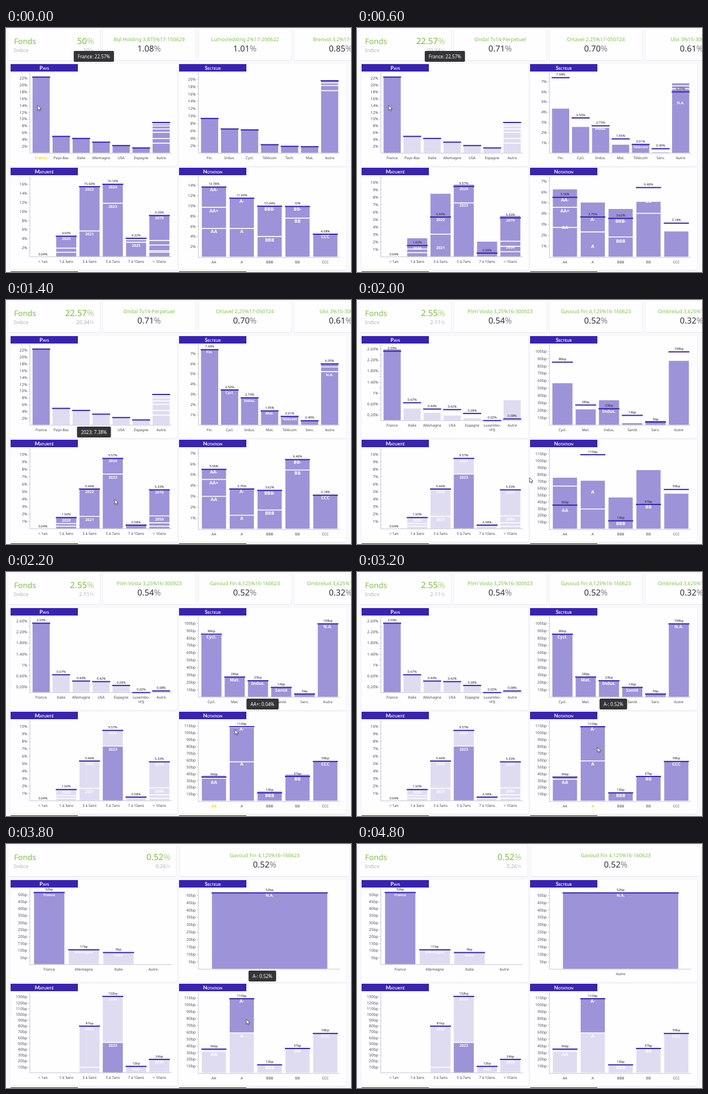
An HTML page for the animation above (5 s loop, 600 by 426 pixels).

```html
<!DOCTYPE html>
<html lang="fr">
<head>
<meta charset="utf-8">
<title>Tableau de bord</title>
<style>
html, body { margin: 0; width: 100%; height: 100%; overflow: hidden; background: #f9f8fa; }
body { position: relative; font-family: "Noto Sans", "Open Sans", sans-serif; }
svg { position: absolute; left: 0; top: 0; text-rendering: geometricPrecision; }
.card { fill: #fefdff; filter: drop-shadow(0 1px 1px #00000012); }
.head { fill: #3823b2; }
.title { fill: #fff; font: 700 9.2px Lato, "Noto Sans", sans-serif; font-variant: small-caps; }
.axis { stroke: #c9c8ce; fill: none; }
.bar { stroke: #fff; stroke-width: 1.5; }
.tick { font-size: 6.8px; fill: #555; }
.label { font-size: 6.3px; fill: #444; }
.hot { fill: #ffd500; font-weight: 700; }
.value { font-size: 5.6px; fill: #222; }
.name { fill: #fff; font-weight: 700; }
.mark { fill: #3522b0; }
#tip { position: absolute; transform: translateX(-50%); height: 19px; padding: 0 7px; border-radius: 2px;
  background: #343336; color: #fff; font-size: 8px; line-height: 19px; white-space: nowrap; }
</style>
</head>
<body>
<svg id="stage" width="600" height="426" viewBox="0 0 600 426"></svg>
<div id="tip"></div>
<script>
const STEP = 200, LOOP = 5000, EASE_MS = 500, LEAD_MS = 195;
const SOLID = '#9d93d8', PALE = '#dfdcf2';

// view: pixels per unit, tick step, last tick, unit, values shown, name size, selection, bars, base
// bar: label|total|top name|name@level...
const view = (k, step, max, unit, values, size, sel, bars, base) => ({
  k, step, max, unit, values, size, sel, base,
  bars: bars.split(';').map(b => {
    const [label, total, ...parts] = b.split('|');
    const segs = (parts.length ? parts : ['']).map(p => {
      const [name, level] = p.split('@');
      return { name, level: +(level ?? total) };
    });
    return { label, total: +total, segs };
  })
});

const countries = 'France|22.57;Pays-Bas|5.1;Italie|4.5;Allemagne|3.4;USA|2.4;Espagne|1.7;' +
  'Autre|9.2||@8.6|@8|@7.1|@6.1|@4.3|@2.9';
const years = '< 1an|0.04;1 à 3ans|1.6|2020|@0.7|@0.35;3 à 5ans|5.44|2022|2021@1.68;' +
  '5 à 7ans|9.57|2024|2023@7.38;7 à 10ans|0.58;> 10ans|5.33|2079|2050@1.75|@0.8|@0.35';
const ratings = 'AA|36||AA@32;A|110|A-|A@59;BBB|13|BBB;BB|37|BB;CCC|59|CCC';
const sectors = 'Cycl.|86|Cycl.;Mat.|28|Mat.;Indus.|23|Indus.;Santé|14|Santé;Serv.|5;Autre|100|N.A.';

const charts = [
  { title: 'Pays', x: 8, y: 63, base: 218.5, views: [
    view(5.93, 2, 22, '%', 0, 6, '', countries),
    view(5.93, 2, 22, '%', 0, 6, 'France', countries),
    view(47.9, 0.2, 2.6, '%', 1, 6, 'France', 'France|2.55;Italie|0.67;Allemagne|0.44;USA|0.42;' +
      'Espagne|0.28;Luxembo- urg|0.02;Autre|0.08', 210.5),
    view(2.44, 5, 50, 'bp', 1, 6, 'France',
      'France|52|France;Allemagne|11|Allemagne;Italie|9|Italie;Autre|0', 210.5)
  ] },
  { title: 'Secteur', x: 301, y: 63, base: 218.5, views: [
    view(6.45, 2, 20, '%', 0, 6.3, '', 'Fin.|9.55;Indus.|6.7;Cycl.|6.45;Télécom|2.45;Tech.|2;Mat.|1.9;' +
      'Autre|19.75||@19|@18.3|@16.9'),
    view(17.85, 1, 7, '%', 1, 6.3, '', 'Fin.|7.44|Fin.;Cycl.|3.5|Cycl.;Indus.|2.73|Indus.;Mat.|1.45|Mat.;' +
      'Télécom|0.91|Télécom;Serv.|0.49;Autre|6.05||@5.7|N.A.@5.23'),
    view(1.29, 10, 100, 'bp', 1, 7.5, '', sectors),
    view(2.58, 5, 50, 'bp', 1, 6.8, '', 'Autre|52|N.A.')
  ] },
  { title: 'Maturité', x: 8, y: 244, base: 399.5, views: [
    view(7.9, 2, 16, '%', 1, 6.6, '', '< 1an|0.04;1 à 3ans|4.69|2020|@1.9|@1;3 à 5ans|15.63|2022|2021@5.7;' +
      '5 à 7ans|16.16|2024|2023@11.83;7 à 10ans|4.22||@3.8|2025@3.2;> 10ans|9.26|2079|@3.6|@2.6|@1.3|@1'),
    view(12.95, 1, 10, '%', 1, 6.6, '', years),
    view(12.95, 1, 10, '%', 1, 6.6, '2023', years),
    view(1.018, 10, 130, 'bp', 1, 6.6, '2023', '< 1an|0;1 à 3ans|0;3 à 5ans|81|2022|@9.5;' +
      '5 à 7ans|132|2024|2023@52;7 à 10ans|12|2027;> 10ans|24|2039')
  ] },
  { title: 'Notation', x: 301, y: 244, base: 400, views: [
    view(8.95, 2, 14, '%', 1, 8, '', 'AA|13.78|AA-|AA+@9.7|AA@5.58;A|11.6|A-|A@5.58;' +
      'BBB|10.04|BBB-|BBB@4;BB|10|BB-|BB@7.6;CCC|4.58|CCC'),
    view(18.95, 1, 7, '%', 1, 8, '', 'AA|5.56|AA-|AA+@4.57|AA@3.02;A|3.75|A-|A@1.28;' +
      'BBB|3.62|BBB-|BBB@1.76;BB|6.46|BB-|BB@5.45;CCC|3.18|CCC'),
    view(1.19, 10, 110, 'bp', 1, 8, '', ratings),
    view(1.19, 10, 110, 'bp', 1, 8, 'A-', ratings)
  ] }
];

const cards = [
  ['50', '50', ['Bql Holding 3,875%17-150629', '1.08'], ['Lumocrediting 2%17-290622', '1.01'], ['Brenvol 3,2%17-010525', '0.85']],
  ['22.57', '20.34', ['Ondal Tv14-Perpetuel', '0.71'], ['Ortavel 2,25%17-050724', '0.70'], ['Ulvi 3%15-300622', '0.61']],
  ['2.55', '2.11', ['Plim Vosta 3,25%16-300923', '0.54'], ['Gavoud Fin 4,125%16-160623', '0.52'], ['Ombrelud 3,625%16-150623', '0.32']],
  ['0.52', '0.26', ['Gavoud Fin 4,125%16-160623', '0.52']]
];

// Timed steps: each entry holds until the next one.
const stateSteps = [[0, 0], [600, 1], [2000, 2], [3400, 3]];
const cursorSteps = [[0, 55, 135], [1200, 150, 250], [1400, 189, 348], [2000, 300, 310], [2200, 398, 275],
  [2400, 410, 292], [2600, 418, 306], [4400, 503, 345], [4600]];
const tipSteps = [[0, 'France: 22.57%', 153, 40], [1200], [1400, '2023: 7.38%', 153, 221], [2000],
  [2200, 'AA+: 0.04%', 446, 221], [2400, 'A-: 0.52%', 446, 221], [4400, 'BB: 0.37%', 446, 221], [4600]];
const hotSteps = [[0, 'France'], [600], [2200, 'AA'], [2400, 'A'], [3400], [4400, 'BB'], [4600]];

const at = (steps, t) => steps.findLast(s => s[0] <= t);
const mix = (a, b, p) => a + (b - a) * p;
const ease = u => u <= 0 ? 0 : u >= 1 ? 1 : u < .5 ? 4 * u ** 3 : 1 - (2 - 2 * u) ** 3 / 2;
const format = (v, unit) => (unit === '%' && v % 1 ? v.toFixed(2) : v) + unit;
const esc = s => String(s).replace('<', '&lt;').replace('>', '&gt;');
const rect = (x, y, w, h, attr) => `<rect x="${x}" y="${y}" width="${w}" height="${h}" ${attr}/>`;
const text = (x, y, s, attr, anchor = 'middle') =>
  `<text x="${x}" y="${y}" text-anchor="${anchor}" ${attr}>${s}</text>`;
const percent = (x, y, n, size, color, anchor) =>
  text(x, y, `${n}<tspan fill-opacity=".6">%</tspan>`, `font-size="${size}" fill="${color}"`, anchor);

function layout(chart, i) {
  const v = chart.views[i], base = v.base ?? chart.base;
  const step = 247 / (v.bars.length + .1);
  return v.bars.map((b, n) => ({
    ...b, x: chart.x + 34 + step * (n + .1), w: step * .9, top: base - b.total * v.k,
    segs: b.segs.map(s => ({ name: s.name, y: base - s.level * v.k }))
  }));
}

function drawChart(chart, i, p, hot) {
  const v = chart.views[i], base = v.base ?? chart.base, left = chart.x + 34;
  const old = i ? layout(chart, i - 1) : [];
  let out = rect(chart.x, chart.y, 290, 178, 'class="card"') + rect(chart.x, chart.y, 117, 13, 'class="head"') +
    text(chart.x + 58.5, chart.y + 9.5, chart.title, 'class="title"');

  let path = `M${left - .5} ${chart.y + 15}V${Math.floor(base) + .5}H${left + 246}`;
  for (let n = 1; n * v.step < v.max + .01; n++) {
    const value = +(n * v.step).toFixed(2), y = base - value * v.k;
    path += `M${left - 3} ${y}h3`;
    if (v.step > .5 || n % 2) out += text(left - 5, y + 2.2, format(value, v.unit), 'class="tick"', 'end');
  }

  let marks = '', texts = '';
  for (const b of layout(chart, i)) {
    const from = i ? old.find(o => o.label === b.label) : b;
    const cx = b.x + b.w / 2;
    const ys = b.segs.map((s, n) => mix(from?.segs[n]?.y ?? base, s.y, p));
    b.segs.forEach((s, n) => {
      const lit = !v.sel || v.sel === b.label || v.sel === s.name;
      const h = (ys[n + 1] ?? base) - ys[n];
      if (h > .8) out += rect(b.x, ys[n], b.w, h, `class="bar" fill="${lit ? SOLID : PALE}"`);
      if (s.name) texts += text(cx, s.y + 5.5 + v.size * .36, s.name, `class="name" font-size="${v.size}"`);
    });
    if (base - b.top > .8) marks += rect(b.x, b.top, b.w, 2, 'class="mark"');
    if (v.values && b.total) texts += text(cx, b.top - 2.4, format(b.total, v.unit), 'class="value"');
    const lines = b.label.startsWith('Lux') ? b.label.split(' ') : [b.label];
    lines.forEach((s, n) => {
      texts += text(cx, base + 10.6 + n * 7, esc(s), `class="label${hot === b.label ? ' hot' : ''}"`);
    });
  }
  return out + `<path class="axis" d="${path}"/>` + marks + texts;
}

function drawCards([fund, index, ...items]) {
  const single = items.length === 1, w = single ? 292 : 159, right = single ? 286 : 153;
  let out = rect(4, 3, w, 53, 'class="card"') +
    text(14, 27.5, 'Fonds', 'font-size="13.5" fill="#7cc544"', 'start') +
    text(14, 42, 'Indice', 'font-size="8.8" fill="#b3b3b5"', 'start') +
    percent(right, 28, fund, 14.8, '#74c136', 'end') + percent(right, 42, index, 9.2, '#b0b0b2', 'end');
  items.forEach(([name, value], n) => {
    const x = single ? 303 : 169 + n * 166.5, cw = single ? 294 : 160, cx = x + cw / 2;
    out += rect(x, 3, cw, 53, 'class="card"') + text(cx, 23.3, name, 'font-size="8.8" fill="#7cc544"') +
      percent(cx, 40.5, value, 14.5, '#2f2f33');
  });
  return out;
}

const stage = document.getElementById('stage'), tip = document.getElementById('tip');

function draw(t) {
  const [since, state] = at(stateSteps, t);
  const p = state ? ease((t - since + LEAD_MS) / EASE_MS) : 1;
  const [, cx, cy] = at(cursorSteps, t), [, label, tx, ty] = at(tipSteps, t), hot = at(hotSteps, t)[1];
  let out = drawCards(cards[state]);
  for (const c of charts) out += drawChart(c, state, p, hot);
  for (const x of [8, 301]) out += rect(x, 425, 117, 13, 'class="head"');
  if (cx) out += `<path transform="translate(${cx} ${cy})" d="M0 0V8.6L2 6.8L3.4 10L4.9 9.3L3.5 6.3H6.2Z"
    fill="#fff" stroke="#222" stroke-width=".7"/>`;
  stage.innerHTML = out;
  tip.hidden = !label;
  if (label) {
    tip.textContent = label;
    tip.style.left = tx + 'px';
    tip.style.top = ty + 'px';
  }
}

let last = -1;
const begin = performance.now();
function loop() {
  const t = Math.floor((performance.now() - begin) % LOOP / STEP) * STEP;
  if (t !== last) draw(last = t);
  requestAnimationFrame(loop);
}
loop();
</script>
</body>
</html>
```
